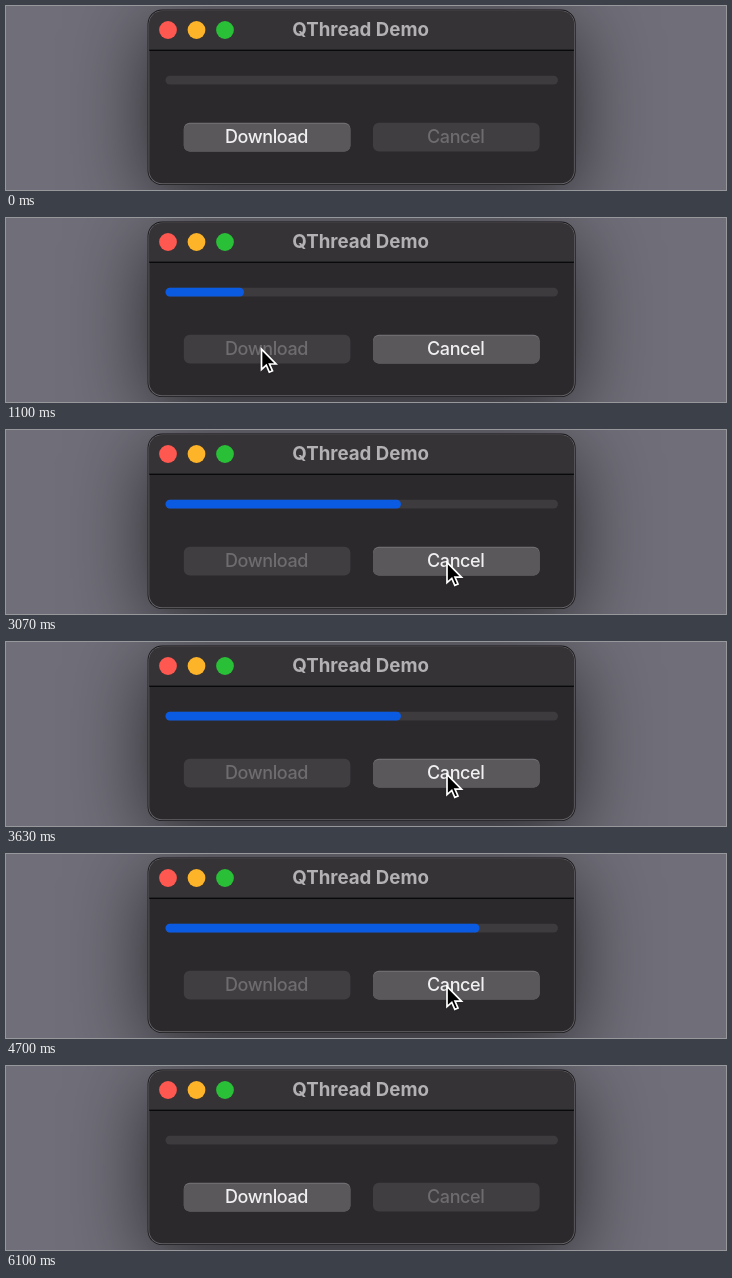
An HTML page with a canvas that plays this animation: 720x184 px, repeating every 6.63 s.

```html
<!DOCTYPE html>
<html lang="en">
<head>
<meta charset="utf-8">
<title>QThread Demo</title>
<style>
  html, body { margin: 0; width: 100%; height: 100%; overflow: hidden; background: #706e78; }
  canvas { display: block; width: 720px; height: 184px; }
</style>
</head>
<body>
<canvas id="stage"></canvas>
<script>
const W = 720, H = 184, LOOP = 6630;
const FONT = 'Inter, Roboto, sans-serif';
const canvas = document.getElementById('stage');
const ctx = canvas.getContext('2d');
const dpr = window.devicePixelRatio || 1;
canvas.width = W * dpr;
canvas.height = H * dpr;

const BAR = { x: 159.5, y: 69.7, w: 392.5, h: 8.8 };
const PRESS = 665, START = 765, RESET = 6065;
const TICKS = [800, 1785, 2785, 3780, 4785];
const TICK_MS = 280;
const STALLS = [[2835, 2965], [3835, 3965]];

const clamp = v => Math.min(1, Math.max(0, v));
const part = (t, from, to) => clamp((t - from) / (to - from));
const lerp = (a, b, k) => a + (b - a) * k;
const easeOut = k => 1 - (1 - k) ** 2;
const easeInOut = k => k * k * (3 - 2 * k);

function roundBox(x, y, w, h, r, fill) {
  ctx.beginPath();
  ctx.roundRect(x, y, w, h, r);
  ctx.fillStyle = fill;
  ctx.fill();
}

function label(text, x, y, font, color, spacing) {
  ctx.font = font + ' ' + FONT;
  ctx.letterSpacing = spacing + 'px';
  ctx.textAlign = 'center';
  ctx.textBaseline = 'alphabetic';
  ctx.fillStyle = color;
  ctx.fillText(text, x, y);
}

function drawWindow() {
  ctx.fillStyle = '#706e78';
  ctx.fillRect(0, 0, W, H);

  ctx.save();
  ctx.shadowColor = 'rgba(0,0,0,0.64)';
  ctx.shadowBlur = 78 * dpr;
  ctx.shadowOffsetY = 16 * dpr;
  roundBox(141.6, 3.6, 428, 175.4, 14.5, '#161517');
  ctx.restore();

  roundBox(142.4, 4.4, 426.4, 173.8, 13.7, '#656367');
  ctx.save();
  ctx.beginPath();
  ctx.roundRect(143.3, 5.3, 424.6, 172, 12.8);
  ctx.clip();
  ctx.fillStyle = '#2b292c';
  ctx.fillRect(142, 4, 428, 176);
  ctx.fillStyle = '#353336';
  ctx.fillRect(142, 4, 428, 40);
  ctx.fillStyle = '#09080a';
  ctx.fillRect(142, 43.6, 428, 1.4);
  ctx.restore();

  ['#ff5850', '#fdb428', '#29c038'].forEach((color, i) => {
    ctx.beginPath();
    ctx.arc(162 + i * 28.5, 24, 8.9, 0, Math.PI * 2);
    ctx.fillStyle = color;
    ctx.fill();
  });
  label('QThread Demo', 354.6, 29.6, '700 18.7px', '#b3b1b4', 0);
}

function progressAt(t) {
  if (t >= RESET) return 0;
  for (const [from, to] of STALLS) if (t > from && t < to) t = from;
  return TICKS.reduce((sum, s) => sum + easeOut(part(t, s, s + TICK_MS)), 0) / TICKS.length;
}

function drawBar(progress) {
  const { x, y, w, h } = BAR;
  roundBox(x, y, w, h, h / 2, '#3d3b3e');
  if (progress > 0) roundBox(x, y, w * progress, h, h / 2, '#0a5ae2');
}

function drawButton(text, x, state) {
  const y = 116.8, w = 166.6, h = 28.8;
  if (state === 'off') {
    roundBox(x, y, w, h, 6, '#403e41');
  } else {
    const pressed = state === 'pressed';
    roundBox(x, y, w, h, 6, pressed ? '#8d8b8e' : '#747276');
    roundBox(x, y + 1, w, h - 1, 6, pressed ? '#777578' : '#5a585b');
  }
  label(text, x + w / 2 - 0.6, 136.6, '500 18px', state === 'off' ? '#6e6c6f' : '#f1f0f1', -0.4);
}

// Tip of the pointer, or null while it is off the stage.
function pointerAt(t) {
  if (t < 30 || t >= 5365) return null;
  if (t < 65) return [274.8, 172];
  if (t < 1690) {
    const k = easeInOut(part(t, 380, 540));
    return [lerp(272.5, 255.5, k), lerp(160.8, 131.2, k)];
  }
  const k = easeInOut(part(t, 1690, 2040));
  const drop = part(t, 5245, 5365) ** 1.4;
  return [lerp(255.5, 441, k), lerp(131.2, 132.4, k) + 9 * Math.sin(Math.PI * k) + 54 * drop];
}

function drawPointer([x, y]) {
  const shape = [[0, 0], [0, 20.3], [4.8, 16], [7.8, 23], [11, 21.6], [8, 14.8], [14.5, 14.8]];
  ctx.save();
  ctx.translate(x, y);
  ctx.beginPath();
  shape.forEach(p => ctx.lineTo(...p));
  ctx.closePath();
  ctx.lineWidth = 1.7;
  ctx.lineJoin = 'miter';
  ctx.miterLimit = 3;
  ctx.strokeStyle = '#fff';
  ctx.fillStyle = '#000';
  ctx.shadowColor = 'rgba(0,0,0,0.4)';
  ctx.shadowBlur = 3 * dpr;
  ctx.shadowOffsetY = dpr;
  ctx.fill();
  ctx.shadowColor = 'transparent';
  ctx.stroke();
  ctx.restore();
}

function draw(t) {
  ctx.setTransform(dpr, 0, 0, dpr, 0, 0);
  const busy = t >= START && t < RESET;
  const pressed = t >= PRESS && t < START;
  drawWindow();
  drawBar(progressAt(t));
  drawButton('Download', 177.8, busy ? 'off' : pressed ? 'pressed' : 'on');
  drawButton('Cancel', 367, busy ? 'on' : 'off');
  const tip = pointerAt(t);
  if (tip) drawPointer(tip);
}

const begin = performance.now();
function tick() {
  draw((performance.now() - begin) % LOOP);
  requestAnimationFrame(tick);
}
tick();
</script>
</body>
</html>
```
